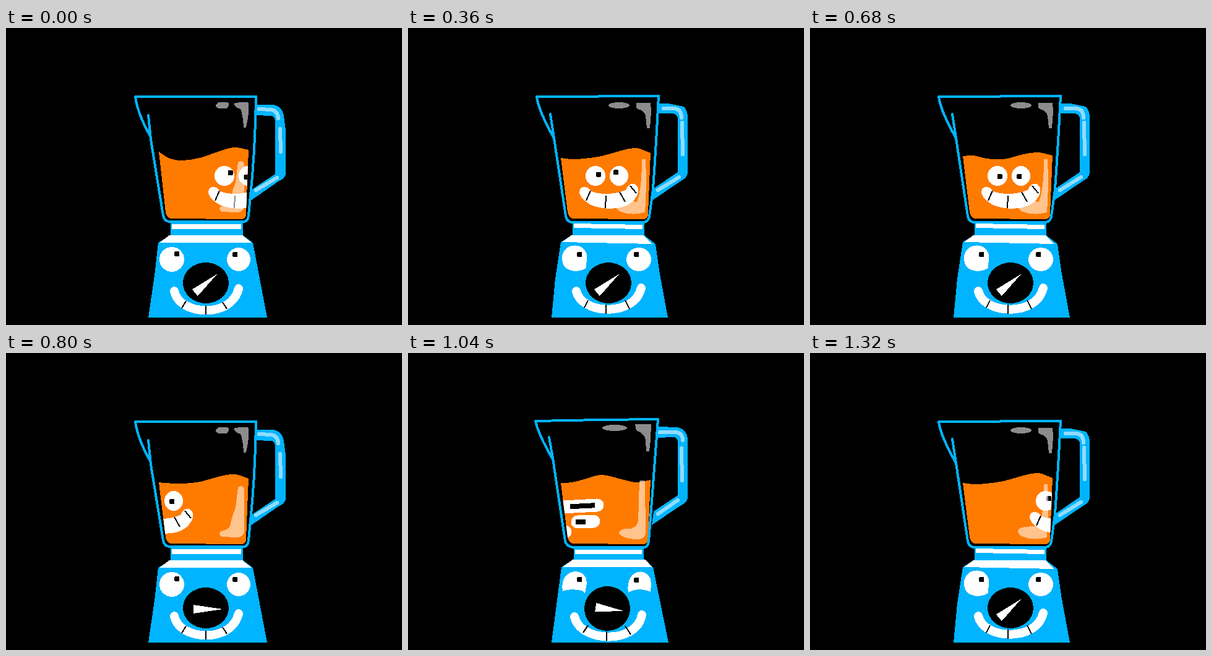
Animation, 640 px wide and 480 px high, one loop 1.36 s. Source, as an HTML page:

```html
<!DOCTYPE html>
<html lang="en">
<head>
<meta charset="utf-8">
<title>Blender</title>
<style>
  html, body { margin: 0; width: 100%; height: 100%; overflow: hidden; background: #000; }
  svg { display: block; width: 640px; height: 480px; shape-rendering: crispEdges; }
  path { fill: none; stroke-linecap: round; stroke-linejoin: round; }
  #jug { stroke: #00b4ff; stroke-width: 4; }
  #grip, #base { fill: #00b4ff; }
  #gripShine { stroke: #8fdcff; stroke-width: 6; }
  #trim, #eyes, .white { fill: #fff; }
  #knob, #pupils, .black { fill: #000; }
  #smile { stroke: #fff; stroke-width: 14; }
  #teeth, .tooth { stroke: #000; stroke-width: 2; stroke-linecap: butt; }
  #juice { fill: #ff7b00; }
  #shine { fill: #fff; opacity: .55; }
  .smear { stroke: #fff; stroke-width: 21; }
  .smear + .dash { stroke: #000; stroke-width: 8; stroke-linecap: butt; }
</style>
</head>
<body>
<svg viewBox="0 0 640 480">
  <defs><clipPath id="inside"><path id="cut"/></clipPath></defs>
  <path id="grip"/><path id="gripShine"/>
  <path id="base"/><path id="trim"/>
  <path id="eyes"/><path id="pupils"/>
  <path id="knob"/>
  <polygon id="pointer" class="white" points="-23,-7 -23,7 24,0"/>
  <path id="smile"/><path id="teeth"/>
  <path id="juice"/>
  <g id="face" clip-path="url(#inside)"></g>
  <path id="shine"/>
  <path id="jug"/>
</svg>
<script>
const STEP = 40, COUNT = 34;
const $ = id => document.getElementById(id);
const mix = (a, b, k) => a + (b - a) * k;
const clamp = k => Math.min(1, Math.max(0, k));
const oval = (x, y, rx, ry = rx) =>
  `M${x - rx},${y}a${rx},${ry} 0 1 1 ${2 * rx},0a${rx},${ry} 0 1 1 ${-2 * rx},0z`;
const dot = (x, y) => `M${x - 4},${y - 3}l1,-1h6l1,1v6l-1,1h-6l-1,-1z`;

// Three hand-drawn versions of the machine
const A = {
  jug: 'M234,176Q213,140 209,111H404Q403,180 398,240L392,303Q391,313 384,313H264Q256,312 254,303L234,180L230,141',
  grip: 'M402,124H432Q446,126 449,142L452,165V237Q450,244 440,248L394,280L396,262L435,236V150Q434,143 430,142L402,141z',
  gripShine: 'M409,131L428,132Q439,133 440,146M443,163L444,200M404,262L438,242',
  base: 'M266,313H383V335L399,347L422,468H230L240,400L246,347L266,335z',
  trim: 'M268,317H380V325H268zM264,335H382L397,347H248z',
  eyes: oval(268, 374, 20) + oval(376, 374, 19),
  pupils: dot(276, 365) + dot(370, 366),
  knob: oval(323, 412, 37, 33),
  smile: 'M272,425C280,465 365,470 376,421',
  teeth: 'M291,441L284,453M323,449V463M350,443L357,454',
  shine: 'M343,120H357Q361,121 360,125Q359,130 354,130H344Q339,129 339,124zM368,122Q378,119 391,120Q394,125 391,145L388,161H384Q383,140 379,131Q371,129 368,122z' +
    'M375,217Q380,213 385,218V290Q383,298 372,298L348,297Q343,292 347,288Q362,286 363,275Q366,262 371,250z'
};
const B = {
  jug: 'M236,178Q211,134 208,111L307,111L308,110H405Q401,190 396,260L390,305Q388,313 381,314H264Q257,313 255,304L236,178L230,139',
  grip: 'M403,122L420,122L446,127Q452,134 452,145V235Q450,243 440,248L394,279L396,260L436,233V148Q436,140 428,138L402,138z',
  gripShine: 'M413,130H430Q442,131 442,145M443,153L444,204M404,262L438,241',
  base: 'M266,313H382V335L400,349L406,392L420,468H232L238,405L247,346L266,334z',
  trim: 'M268,316L379,318V325L268,323zM264,335L380,335L395,349L249,346z',
  eyes: 'M249,372C249,345 289,345 289,370L288,388Q282,392 272,393Q249,392 249,372z' + oval(373, 374, 20, 19),
  pupils: dot(277, 366) + dot(369, 366),
  knob: oval(324, 412, 37, 33),
  smile: 'M272,425C280,463 366,468 377,420',
  teeth: 'M291,440L285,452M320,447V462M351,440L358,454',
  shine: oval(341, 125, 17, 5) + 'M369,121H392L393,135L391,162H386L384,142Q382,133 371,131Q368,128 369,121z' +
    'M378,212H384Q386,260 383,298Q360,304 342,296Q330,288 342,282Q360,279 370,281Q378,260 378,212z'
};
const C = {
  jug: 'M233,170Q211,132 206,110L310,108L404,107Q399,170 394,240L389,305Q388,313 382,314H266Q257,313 254,304L234,170L228,136',
  grip: 'M403,119L436,120Q451,124 452,140V235Q450,242 440,247L394,278L397,256L436,230V144Q436,137 430,136L402,137z',
  gripShine: 'M405,128H432Q444,129 444,141M442,154L443,206M404,260L436,238',
  base: 'M268,313H381V333L396,346L421,468H232L248,346L268,333z',
  trim: 'M270,318H378V325H270zM266,334H384L394,346H250z',
  eyes: 'M250,385C243,346 290,344 289,372L286,389L281,384Q262,380 250,385zM356,387C350,346 393,344 393,373L392,386Q372,378 356,387z',
  pupils: dot(277, 366) + dot(369, 367),
  knob: oval(322, 413, 37, 36),
  smile: 'M269,426C278,468 370,472 378,423',
  teeth: 'M291,440L283,452M321,450V465M351,441L360,455',
  shine: oval(334, 121, 20, 5) + 'M367,115H393L392,140L390,159H385L384,140Q382,130 369,125z' +
    'M374,207Q378,204 383,207L384,290Q384,300 372,301Q350,301 342,293Q338,288 350,284Q368,286 372,272z'
};
const POSES = [A, B, C, B];

// Key lists: [step, values...]
const SLIDE = [[-3, 149], [-2, 105], [-1, 78], [0, 50], [1, 22], [2, 5], [3, 0], [18, 0], [19, -14], [20, -70]];
const ROLL_L = [[-1, -38, 6], [0, -27, 11], [5, 186, 9], [9, 338, 5.4], [12, 374, 4]];
const ROLL_R = [[0, 146, 3.6], [5, 117, 9], [9, 230, 7.5], [12, 162, 3]];
const DIAL = [[18, -40, 0], [20, 0, 3], [22, 19, 6], [26, 8, 3], [28, -10, 2], [30, -40, 0]];
const WAVE_X = [247, 265, 285, 313, 345, 369, 392];
const WAVES = [
  [0, 200, 211, 214, 210, 199, 193, 197],
  [2, 210, 209, 204, 197, 204, 209, 205],
  [5, 207, 206, 211, 212, 204, 201, 206],
  [9, 210, 212, 211, 207, 198, 194, 202],
  [10, 209, 203, 200, 203, 208, 208, 201],
  [12, 200, 211, 214, 210, 199, 193, 197]
];
// Smears: [x, length, y, rise, dash start, dash length] at two moments
const SMEARS = [
  [[230, 116, 243, -9, 26, 44], [230, 76, 250, -4, 32, 40]],
  [[289, 85, 264, -6, 38, 40], [274, 26, 273, -1, -3, 16]],
  [[220, 60, 286, 0, 0, 0], [204, 50, 289, 0, 0, 0]]
];
const LAP = 260;

function at(keys, t) {
  let n = keys.findIndex(k => k[0] >= t);
  if (n < 0) return keys[keys.length - 1].slice(1);
  if (n === 0) return keys[0].slice(1);
  const a = keys[n - 1], b = keys[n], k = (t - a[0]) / (b[0] - a[0]);
  return a.slice(1).map((v, j) => mix(v, b[j + 1], k));
}

function juicePath(i) {
  const y = at(WAVES, i % 12), x = WAVE_X, last = x.length - 1;
  const slope = n => {
    const p = Math.max(0, n - 1), q = Math.min(last, n + 1);
    return (y[q] - y[p]) / (x[q] - x[p]);
  };
  let d = `M${x[0]},${y[0]}`;
  for (let n = 0; n < last; n++) {
    const h = (x[n + 1] - x[n]) / 3;
    d += `C${x[n] + h},${y[n] + h * slope(n)} ${x[n + 1] - h},${y[n + 1] - h * slope(n + 1)} ${x[n + 1]},${y[n + 1]}`;
  }
  return d + 'L388,300Q388,309 380,309L266,308Q260,307 258,298z';
}

function pupil(x, y, [angle, r]) {
  const a = angle * Math.PI / 180;
  return dot(x + r * Math.cos(a), y + r * Math.sin(a));
}

function calmFace(t) {
  return `<g transform="translate(${at(SLIDE, t)[0]})">
    <path class="white" d="${oval(303, 239, 16)}${oval(341, 239, 15, 16)}"/>
    <path class="black" d="${pupil(303, 239, at(ROLL_L, t))}${pupil(341, 239, at(ROLL_R, t))}"/>
    <path class="white" d="M283,257Q291,256 296,264Q322,273 352,262Q357,250 366,252Q374,256 372,266Q366,284 345,290Q318,295 296,286Q278,276 277,265Q278,258 283,257z"/>
    <path class="tooth" d="M295,263L288,279M320,271L319,291M342,265L351,281M359,255L369,267"/></g>`;
}

function smearedFace(i) {
  const k = (i - 22) / 4;
  return SMEARS.map(([a, b]) => {
    const [x, len, y, rise, from, dash] = a.map((v, j) => mix(v, b[j], clamp(k)));
    const line = (cls, p, q) =>
      `<path class="${cls}" d="M${x + p},${y + rise * p / len}L${x + q},${y + rise * q / len}"/>`;
    const shape = line('smear', 0, len) + (dash ? line('dash', from, from + dash) : '');
    const shift = -LAP * (k - Math.floor(k));
    return [shift, shift + LAP].map(s => `<g transform="translate(${s})">${shape}</g>`).join('');
  }).join('');
}

function draw(i) {
  const pose = POSES[i % 4];
  for (const id in pose) $(id).setAttribute('d', pose[id]);
  const d = juicePath(i);
  $('juice').setAttribute('d', d);
  $('cut').setAttribute('d', d);
  const [angle, push] = at(DIAL, i);
  $('pointer').setAttribute('transform', `translate(${323 + push},${413 + push / 3}) rotate(${angle})`);
  const whirling = i > 20 && i < 32;
  $('face').innerHTML = whirling ? smearedFace(i) : calmFace(i < 32 ? i : i - COUNT);
}

let shown = -1;
const start = performance.now();
function tick() {
  const i = Math.floor((performance.now() - start) / STEP) % COUNT;
  if (i !== shown) draw(shown = i);
  requestAnimationFrame(tick);
}
tick();
</script>
</body>
</html>
```
